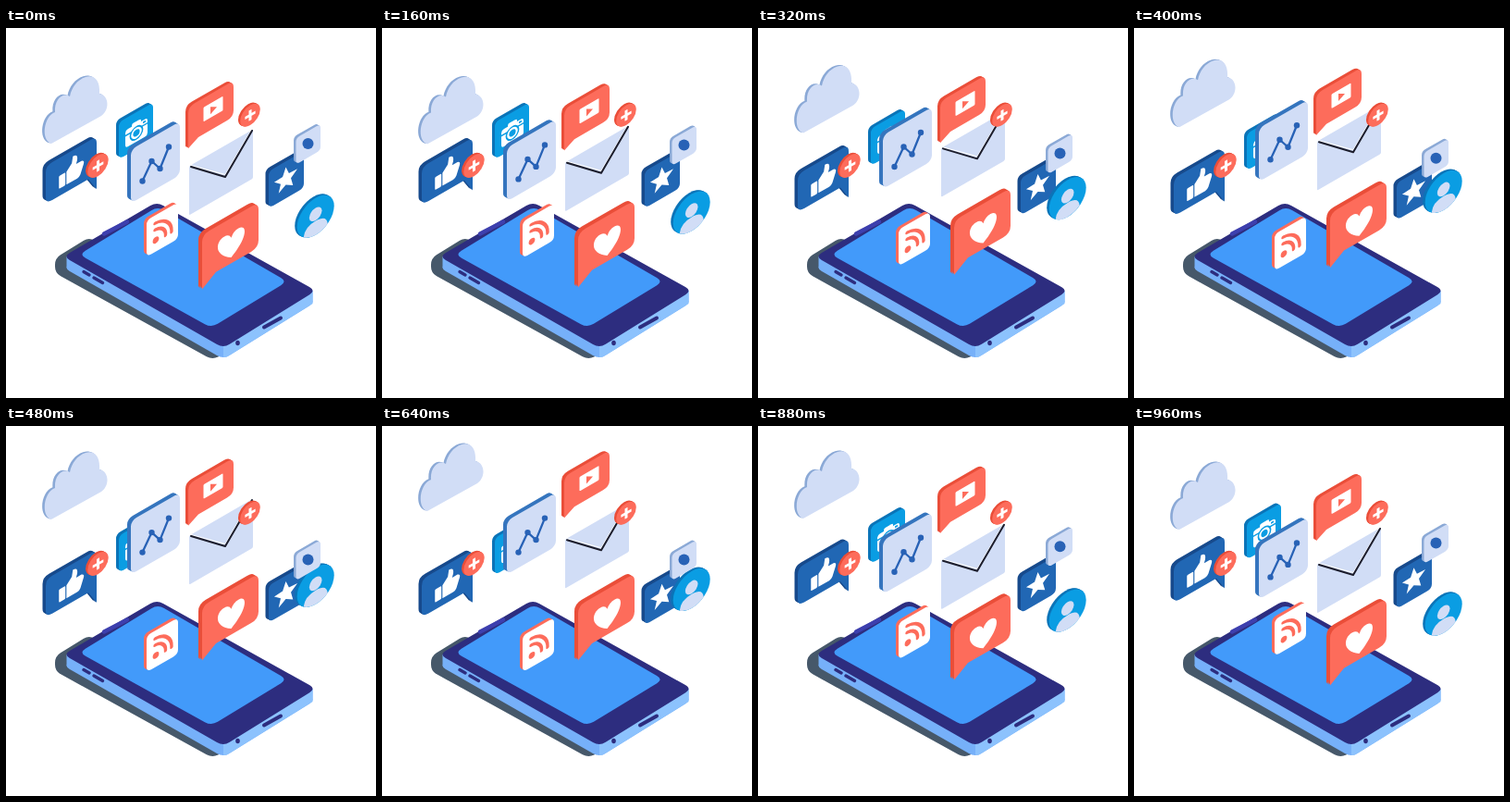
Write an HTML page that moves like this. It is 400 by 400 pixels and loops after 1.04 s.

```html
<!DOCTYPE html>
<html lang="en">
<head>
<meta charset="utf-8">
<title>Phone with floating icons</title>
<style>
html, body { margin: 0; width: 100%; height: 100%; overflow: hidden; background: #fff; }
svg { display: block; width: 100vw; height: 100vh; }
</style>
</head>
<body>
<svg id="stage" viewBox="0 0 400 400"></svg>
<script>
const STEP = 80, LOOP = 1040;
const SLOPE = -0.577;
const C = {
  navy: '#2d2d7f', screen: '#429afa', edge: '#76b0f9', edgeLit: '#8cc2fd', shadow: '#46586a',
  red: '#fd6c5b', redSide: '#ea4e39', blue: '#2167b4', blueSide: '#174a8c',
  sky: '#0a9de3', skySide: '#0b74b8', pale: '#d1ddf6', paleSide: '#8ba9d6',
  line: '#2862b6', chartSide: '#3575be', ink: '#1c1d2c', white: '#fff'
};

const path = (d, fill, extra = '') => `<path d="${d}" fill="${fill}" ${extra}/>`;
const stroke = (d, color, width) =>
  path(d, 'none', `stroke="${color}" stroke-width="${width}" stroke-linecap="round" stroke-linejoin="round"`);
const dot = (x, y, r, fill) => `<circle cx="${x}" cy="${y}" r="${r}" fill="${fill}"/>`;
const box = (x, y, w, h, r, fill) =>
  `<rect x="${x}" y="${y}" width="${w}" height="${h}" rx="${r}" fill="${fill}"/>`;
const shift = (x, y, body, scale = 1) =>
  `<g transform="translate(${x} ${y}) scale(${scale})">${body}</g>`;
const iso = (x, y, body) => `<g transform="matrix(1 ${SLOPE} 0 1 ${x} ${y})">${body}</g>`;

// Closed path through the points with softened corners.
function rounded(points, radius) {
  const n = points.length;
  const toward = (a, b) => {
    const len = Math.hypot(b[0] - a[0], b[1] - a[1]);
    const f = Math.min(radius / len, 0.5);
    return [a[0] + (b[0] - a[0]) * f, a[1] + (b[1] - a[1]) * f];
  };
  return points.map((p, i) => {
    const from = toward(p, points[(i + n - 1) % n]);
    const to = toward(p, points[(i + 1) % n]);
    return `${i ? 'L' : 'M'}${from}Q${p} ${to}`;
  }).join('') + 'Z';
}

// Solid slab: a face with its thickness showing at the upper left.
function slab(x, y, shape, face, side, depth, art = '') {
  const layers = [1, 0.66, 0.33].map(f =>
    shift(-depth * f, -depth * f * 0.55, iso(x, y, shape(side))));
  return layers.join('') + iso(x, y, shape(face) + art);
}

const tile = (w, h, r) => fill => box(0, 0, w, h, r, fill);
const disc = r => fill => dot(0, 0, r, fill);
const outline = d => fill => path(d, fill);

function phone() {
  const top = rounded([[163, 188], [335, 284], [235, 346], [62, 247]], 8);
  const screen = rounded([[164, 193], [304, 274], [222, 324], [79, 245]], 8);
  return path(rounded([[90, 226], [53, 249], [53, 265], [223, 358.5], [262, 340]], 7), C.shadow) +
    shift(0, 12, path(top, C.edge)) +
    path('M65.5 247L331.5 284V296L235 340L65.5 259Z', C.edge) +
    path('M235 344L331.5 284V298L239 355.5L235 356Z', C.edgeLit) +
    path(top, C.navy) +
    path(screen, C.screen) +
    stroke('M106 222.5L131 209.5', '#3d3fae', 4.5) +
    stroke('M84 263.5L90 267M95 270L104.5 275.5', C.navy, 3.4) +
    stroke('M279 323.5L297 313.5', C.navy, 4) +
    `<ellipse cx="250.5" cy="340.5" rx="2.3" ry="2.8" fill="${C.navy}"/>`;
}

function plus(x, y, r) {
  const s = r * 0.52;
  return slab(x, y, disc(r), C.red, C.redSide, 2.2,
    `<path d="M${-s} 0H${s}M0 ${-s}V${s}" stroke="#fff" stroke-width="3"/>`);
}

function cloud() {
  const d = 'M49 125L103 95C112 89 112 73 101 71C102 56 95 50 86 53C77 56 71 64 69 74' +
    'C61 69 52 78 53 91C41 95 37 121 49 125Z';
  return shift(-2.6, -0.8, path(d, C.paleSide)) + shift(-1.3, -0.4, path(d, C.paleSide)) + path(d, C.pale);
}

function thumb() {
  const bubble = 'M7 0H48Q55 0 55 7V57L46 41H7Q0 41 0 34V7Q0 0 7 0Z';
  const hand = 'M-4 -1L1 -6L2 -12Q7 -12 6 -6L5 -3H10Q13 -2 12 1L9 9Q8 11 6 11H-4Z';
  return slab(43, 149, outline(bubble), C.blue, C.blueSide, 3.5,
    shift(27, 20.5, path(hand, C.white) + box(-11, -1, 6, 12, 1, C.white), 1.16));
}

function camera() {
  const art = box(7, 13, 24, 19, 3, C.white) + box(14, 10, 10, 5, 2, C.white) +
    box(7, 18, 24, 1.6, 0, C.sky) +
    dot(19, 22.5, 7.4, C.sky) + dot(19, 22.5, 5.8, C.white) + dot(19, 22.5, 3.6, C.sky) +
    box(26, 14.5, 3, 2, 0.5, C.sky);
  return slab(122, 101.5, tile(37, 40, 5), C.sky, C.skySide, 3, art);
}

function chart() {
  const pts = [[147.5, 165.5], [157.5, 144], [166.5, 152], [176, 128.5]];
  return slab(135, 131.5, tile(53, 58, 6), C.pale, C.chartSide, 4) +
    stroke('M' + pts.join('L'), C.line, 2.3) +
    pts.map(p => dot(...p, 3.2, C.line)).join('');
}

function video() {
  const bubble = 'M7 0H42Q49 0 49 7V32Q49 39 42 39H11L0 45V7Q0 0 7 0Z';
  return slab(197, 87.5, outline(bubble), C.red, C.redSide, 3,
    box(16.5, 10, 21, 15.5, 1, C.white) + path('M24 13.8L31 17.8L24 21.8Z', C.red));
}

function envelope() {
  return iso(198, 150, box(0, 0, 69, 53, 1.5, C.pale)) +
    stroke('M200 149L237 159L266 109.5', C.white, 1) +
    stroke('M200 150.5L237 161.5L266 111.5', C.ink, 2);
}

function star() {
  const pts = Array.from({ length: 10 }, (_, i) => {
    const r = i % 2 ? 5.8 : 13.2, a = i * Math.PI / 5 - Math.PI / 2;
    return [(18.5 + r * Math.cos(a)).toFixed(2), (19.5 + r * Math.sin(a)).toFixed(2)];
  });
  return slab(284, 154.5, tile(38, 40, 5), C.blue, C.blueSide, 3.5, path('M' + pts.join('L') + 'Z', C.white));
}

const badge = () => slab(313.5, 119, tile(26.5, 28.5, 4), C.pale, C.paleSide, 2.5) +
  dot(326.5, 125, 6, C.line);

function person() {
  return slab(334.7, 204.3, disc(20), C.sky, C.skySide, 2.5,
    dot(0, -2.5, 6.8, C.pale) +
    path('M-13 15.2Q-12 4.8 0 4.8Q12 4.8 13 15.2A20 20 0 0 1 -13 15.2Z', C.pale));
}

function feed() {
  return slab(152, 208, tile(34, 39.5, 5), C.white, C.red, 3,
    dot(10, 27, 3.4, C.red) +
    stroke('M9 15.5A11.5 11.5 0 0 1 20.5 28M9 8.5A18.5 18.5 0 0 1 27 28', C.red, 3.4));
}

function heart() {
  const bubble = 'M8 0H53Q61 0 61 8V41Q61 49 53 49H15L0 59V8Q0 0 8 0Z';
  const shape = 'M0 14C-17 3 -15 -10 -7 -10Q-2 -10 0 -5Q2 -10 7 -10C15 -10 17 3 0 14Z';
  return slab(212, 223.5, outline(bubble), C.red, C.redSide, 4, shift(31.5, 27, path(shape, C.white), 1.12));
}

// Smooth swing of the given height; lag delays it in steps.
const swing = (height, lag = 0) => k => height * (1 - Math.cos((k - lag) * Math.PI / 6)) / 2;
const still = () => 0;

// Slow climb, then a quick drop: [step, offset].
const drift = [[0, 0], [1, 0.5], [3, -11.5], [5, -24], [7, -33], [9, -37], [11, -13], [12, 0]];
function climb(k) {
  const i = drift.findIndex(p => p[0] > k);
  const [a, y0] = drift[i - 1], [b, y1] = drift[i];
  return y0 + (y1 - y0) * (k - a) / (b - a);
}

const parts = [
  [phone(), still],
  [cloud(), climb],
  [thumb(), swing(18)],
  [plus(99.5, 149, 11.2), still],
  [camera(), swing(20, 0.5)],
  [chart(), swing(-31)],
  [video(), swing(-33, 1)],
  [envelope(), swing(-32, -0.5)],
  [plus(264, 94.3, 10.8), still],
  [star(), swing(21, 0.5)],
  [person(), swing(-32, -0.5)],
  [badge(), swing(21)],
  [feed(), swing(20)],
  [heart(), swing(-31)]
];

const stage = document.getElementById('stage');
stage.innerHTML = parts.map(([body]) => `<g>${body}</g>`).join('');
const groups = [...stage.children];

function draw(now) {
  const t = now % LOOP;
  const k = Math.max(0, Math.floor(t / STEP) - 1);
  parts.forEach(([, move], i) =>
    groups[i].setAttribute('transform', `translate(0 ${move(k).toFixed(2)})`));
}

function tick() {
  draw(performance.now());
  requestAnimationFrame(tick);
}
tick();
</script>
</body>
</html>
```
